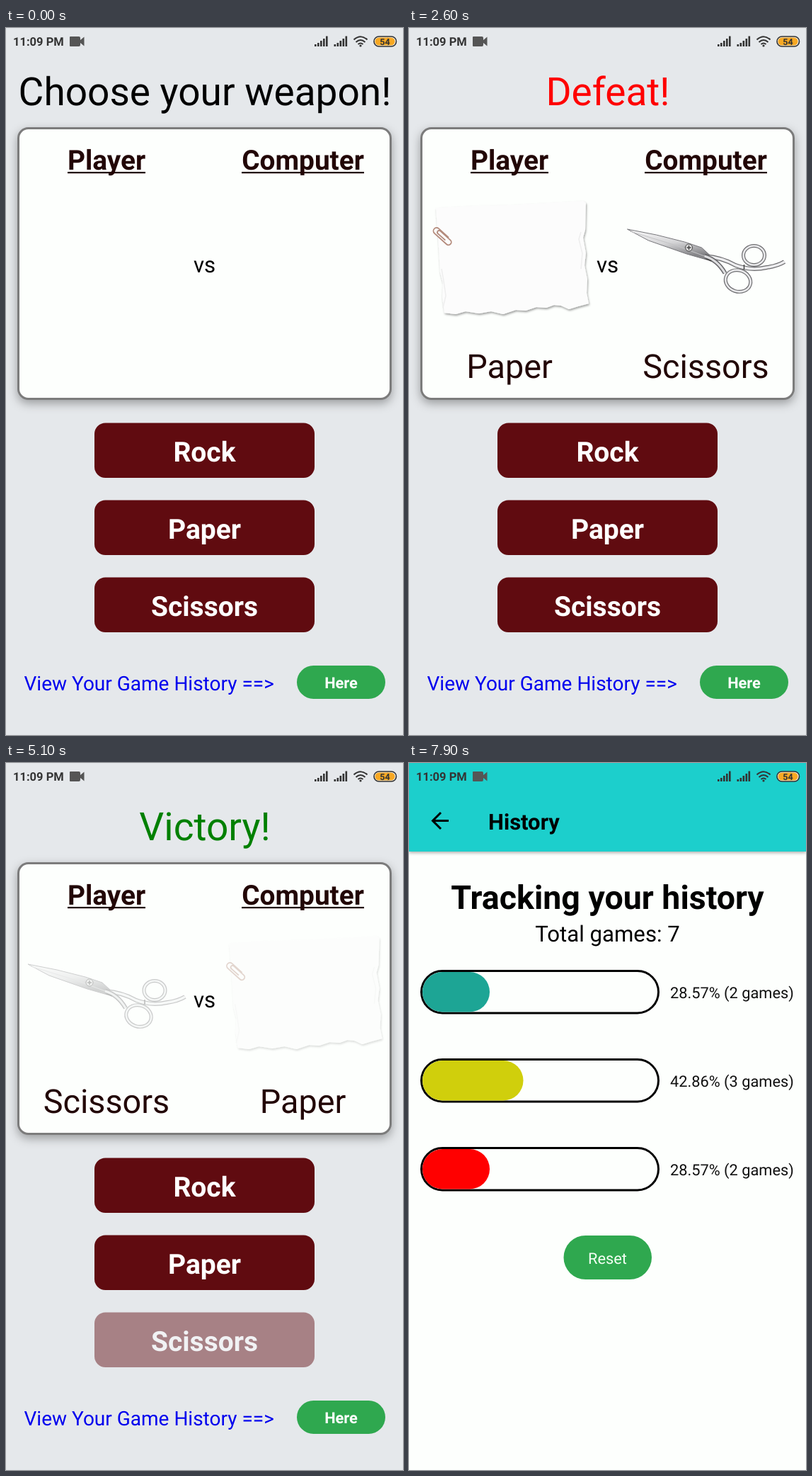
An HTML page for the animation above (8 s loop, 561x998 px).

```html
<!DOCTYPE html>
<html lang="en">
<head>
<meta charset="utf-8">
<title>Rock Paper Scissors</title>
<style>
  html, body { margin: 0; width: 100%; height: 100%; overflow: hidden; background: #e5e8eb; }
  svg { display: block; width: 100vw; height: 100vh; font-family: Roboto, Arial, sans-serif; text-rendering: geometricPrecision; }
  .mid { text-anchor: middle; }
  .bold { font-weight: 700; }
  .dark { fill: #220606; }
  .btn rect { fill: #600b10; }
  .btn text { fill: #fff; font-size: 39px; }
  .pill { fill: #2fa84f; }
  .stat { font-size: 21.8px; fill: #111; }
</style>
</head>
<body>
<svg viewBox="0 0 561 998">
  <defs>
    <filter id="cardShadow" x="-10%" y="-10%" width="120%" height="120%">
      <feDropShadow dx="0" dy="5" stdDeviation="7" flood-opacity=".33"/>
    </filter>
    <filter id="paperShadow" x="-10%" y="-10%" width="120%" height="120%">
      <feDropShadow dx="1" dy="2" stdDeviation="1.6" flood-opacity=".38"/>
    </filter>
    <filter id="barShadow" x="-5%" y="-10%" width="110%" height="130%">
      <feDropShadow dx="0" dy="2" stdDeviation="2" flood-opacity=".3"/>
    </filter>
    <filter id="grain">
      <feTurbulence type="fractalNoise" baseFrequency=".16" numOctaves="4" seed="8"/>
      <feColorMatrix values="0 0 0 0 .3  0 0 0 0 .31  0 0 0 0 .33  1.6 0 0 0 -.6"/>
      <feComposite in2="SourceGraphic" operator="in" result="specks"/>
      <feMerge><feMergeNode in="SourceGraphic"/><feMergeNode in="specks"/></feMerge>
    </filter>
    <linearGradient id="stone" x2=".3" y2="1">
      <stop stop-color="#cfd1d4"/><stop offset="1" stop-color="#b0b2b6"/>
    </linearGradient>
    <linearGradient id="steel" x2=".3" y2="1">
      <stop stop-color="#fafafa"/><stop offset=".55" stop-color="#d5d5d7"/><stop offset="1" stop-color="#858588"/>
    </linearGradient>

    <g id="Rock" filter="url(#grain)">
      <path id="slab" fill="url(#stone)" d="M43 263 60 259 120 256 190 258 227 256 234 261 240 275 245 290 244 322 240 346 236 387 222 390 206 388 165 391 125 393 90 389 61 383 41 377 36 366 38 342 42 300Z"/>
      <path fill="#d6d7da" d="M43 263 60 259 120 256 227 256 222 275 190 290 150 305 128 282 90 271Z"/>
      <path fill="#c2c5ca" d="M227 256 240 275 245 290 244 322 222 307 206 292 222 275Z"/>
      <path fill="#b4b7bc" d="M43 263 90 271 128 282 150 305 132 330 118 360 61 383 41 377 36 366 42 300Z"/>
      <path fill="#a9a9ab" d="M118 360 150 354 182 357 213 377 236 378 236 387 206 388 125 393 98 388Z"/>
      <path fill="none" stroke="#e2e3e5" stroke-width="2" d="M46 270 78 274 128 284 150 306 206 291 224 274M132 330 170 319 206 291"/>
      <path fill="none" stroke="#939599" d="M118 360 150 354 182 357 213 377M150 306 132 330 118 360"/>
    </g>

    <g id="Paper">
      <path filter="url(#paperShadow)" fill="#fcfcfc" d="M38 254 90 251 140 250 195 247 246 244 250 247 249 285 246 296 250 318 248 335 252 355 251 374 254 389 239 393 226 397 215 392 205 391 194 395 180 394 165 399 151 398 133 404 116 400 99 403 80 400 66 404 50 402 47 380 48 360 44 345 42 310Z"/>
      <path fill="none" stroke="#eee" stroke-width="1.5" d="M48 395 52 378 49 357 46 340M243 288 240 298 245 318 243 340"/>
      <g fill="none" stroke="#b48b7c" stroke-width="1.8" transform="translate(47.500 293.500) rotate(42)">
        <path d="M8-4H-11A4.500 4.500 0 0 0-11 5H12A4 4 0 0 0 12-3H-7A2.200 2.200 0 0 0-7 2H7"/>
      </g>
    </g>

    <g id="Scissors" fill="none" stroke="#77777b">
      <path fill="url(#steel)" d="M31 284 72 292 112 302 136 310 148 321 143 327 115 319 61 300Z"/>
      <path stroke="#c4c4c6" d="M35 287 100 307 140 322"/>
      <path stroke="#68686b" stroke-width="6" d="M140 322Q165 324 184 335 205 343 228 338 243 336 253 330"/>
      <path stroke="#ececee" stroke-width="3.500" d="M140 322Q165 324 184 335 205 343 228 338 243 336 253 330"/>
      <path stroke="#68686b" stroke-width="6" d="M140 322Q158 327 169 346"/>
      <path stroke="#dedee0" stroke-width="3" d="M140 322Q158 327 169 346"/>
      <g stroke="#6d6d70" stroke-width="5">
        <ellipse id="ringA" cx="210" cy="321" rx="15" ry="13.500"/>
        <ellipse cx="187.500" cy="357" rx="18" ry="15" transform="rotate(18 187.500 357)"/>
      </g>
      <g stroke="#e9e9eb" stroke-width="2.600">
        <ellipse cx="210" cy="321" rx="15" ry="13.500"/>
        <ellipse cx="187.500" cy="357" rx="18" ry="15" transform="rotate(18 187.500 357)"/>
      </g>
      <circle cx="118" cy="310" r="5" fill="#ddd" stroke="#444"/>
      <path stroke="#444" stroke-width="1.500" d="M115 310H121M118 307V313M142 326 150 329M196 334V341"/>
    </g>
  </defs>

  <rect width="561" height="998" fill="#e5e8eb"/>
  <text id="title" class="mid" x="281" y="109" font-size="55"></text>
  <rect x="17.500" y="141.500" width="526" height="382" rx="14" fill="#fdfffd" stroke="#7b7b7b" stroke-width="3" filter="url(#cardShadow)"/>
  <g class="mid bold dark" font-size="38.800">
    <text x="142" y="200">Player</text><path d="M87 203h110v2.200h-110z"/>
    <text x="419.500" y="200">Computer</text><path d="M333 203h173v2.200h-173z"/>
  </g>
  <text class="mid" x="280.500" y="345" font-size="31.200">vs</text>
  <use id="pic0"/><use id="pic1" x="277.500"/>
  <g class="mid dark" font-size="46.750">
    <text id="name0" x="142" y="494"></text><text id="name1" x="419.500" y="494"></text>
  </g>
  <g id="buttons"></g>
  <text x="25.500" y="935" font-size="28" fill="#0000ee">View Your Game History ==&gt;</text>
  <g id="here">
    <rect class="pill" x="411" y="900" width="125" height="47" rx="23.500"/>
    <text class="mid bold" x="473.500" y="932" font-size="21.800" fill="#fff">Here</text>
  </g>

  <g id="history">
    <rect width="561" height="1098" fill="#fdfffd"/>
    <rect width="561" height="125" fill="#1bcfcc" filter="url(#barShadow)"/>
    <path fill="none" stroke="#000" stroke-width="3" d="M56 81.500H34M45 70 33.500 81.500 45 93"/>
    <text class="bold" x="112" y="94" font-size="31">History</text>
    <text class="mid bold" x="280.500" y="206" font-size="46.500">Tracking your history</text>
    <text class="mid" x="280.500" y="252" font-size="31.200">Total games: 7</text>
    <g id="bars"></g>
    <rect class="pill" x="218.500" y="667" width="124.500" height="62" rx="31"/>
    <text class="mid" x="280.500" y="706.500" font-size="21.800" fill="#f4fff4">Reset</text>
  </g>

  <g id="status" fill="#333">
    <text x="10" y="25" font-size="16.500" font-weight="600">11:09 PM</text>
    <path fill="#555" d="M91 12H103Q105 12 105 14V17L110.500 12.500V25.500L105 21V24Q105 26 103 26H91Q90 26 90 25V13Q90 12 91 12Z"/>
    <path id="signal" d="M436 23h2.600v3h-2.600zM440 21h2.600v5h-2.600zM444 18h2.600v8h-2.600zM448 15h2.600v11h-2.600zM452 11.500h2.600v14.500h-2.600z"/>
    <use href="#signal" x="27.500"/>
    <g fill="none" stroke="#333" stroke-width="2">
      <path d="M491.500 16.500Q501 8 510.500 16.500M494.500 20Q501 14 507.500 20M497.500 23Q501 20 504.500 23"/>
    </g>
    <circle cx="501" cy="25" r="1.600"/>
    <path id="traffic" fill="none" stroke="#333" d="M507 22v4M509.500 22v4"/>
    <rect x="520" y="12" width="31.500" height="14" rx="7" fill="#eee" stroke="#333" stroke-width="1.600"/>
    <path fill="#f7a823" d="M527 13.500H540V24.500H527A5.500 5.500 0 0 1 527 13.500Z"/>
    <path fill="#f7a823" d="M539 13.500H544A5.500 5.500 0 0 1 544 24.500H539Z"/>
    <text class="mid bold" x="535.500" y="23.500" font-size="12.500">54</text>
  </g>
</svg>
<script>
const LOOP = 8000, PRESS = 110, RELEASE = 250;
const FADE_DELAY = 30, FADE = 200;
const OPEN = 6850, OPEN_TIME = 350;
const $ = id => document.getElementById(id);
const clamp = v => Math.min(1, Math.max(0, v));
const easeInOut = p => p < .5 ? 2 * p * p : 1 - 2 * (1 - p) ** 2;

const WEAPONS = ['Rock', 'Paper', 'Scissors'];
const RESULTS = [['Tie game!', '#000'], ['Victory!', '#008000'], ['Defeat!', '#f00']];

// release time, player's weapon, computer's weapon
const games = [
  [1270, 0, 0], [1900, 2, 0], [2250, 1, 2], [3200, 2, 2],
  [4390, 0, 0], [5000, 2, 1], [5983, 1, 0]
];

$('buttons').innerHTML = WEAPONS.map((name, i) => `<g class="btn" id="btn${i}">
  <rect x="125" y="${557.5 + 109 * i}" width="311" height="77.500" rx="15.500"/>
  <text class="mid bold" x="280.500" y="${612 + 109 * i}">${name}</text></g>`).join('');

$('bars').innerHTML = [
  ['28.57% (2 games)', 95, '#1da595'],
  ['42.86% (3 games)', 142.5, '#d0cf0c'],
  ['28.57% (2 games)', 95, '#f00']
].map(([label, width, color], i) => `<g transform="translate(0 ${125 * i})">
  <rect x="17.500" y="293.500" width="335" height="59.500" rx="29.700" fill="none" stroke="#000" stroke-width="3"/>
  <rect x="19" y="295" width="${width}" height="56.500" rx="28.200" fill="${color}"/>
  <text class="stat" x="369" y="332">${label}</text></g>`).join('');

// Touch feedback: dims while held, recovers after release.
function touch(t, release) {
  if (t < release - PRESS || t > release + RELEASE) return 1;
  return t < release
    ? 1 - .8 * easeInOut((t - release + PRESS) / PRESS)
    : .2 + .8 * easeInOut((t - release) / RELEASE);
}

function drawSide(side, t, played) {
  const pic = $('pic' + side), label = $('name' + side);
  if (!played.length) {
    pic.setAttribute('opacity', 0);
    label.textContent = '';
    return;
  }
  let k = played.length - 1;
  const weapon = played[k][side + 1];
  // An unchanged picture stays and does not fade in again.
  while (k > 0 && played[k - 1][side + 1] === weapon) k--;
  const href = '#' + WEAPONS[weapon];
  if (pic.getAttribute('href') !== href) pic.setAttribute('href', href);
  pic.setAttribute('opacity', clamp((t - played[k][0] - FADE_DELAY) / FADE));
  label.textContent = WEAPONS[weapon];
}

function draw(t) {
  const played = games.filter(g => g[0] <= t);
  const last = played[played.length - 1];
  const [text, color] = last ? RESULTS[(last[1] - last[2] + 3) % 3] : ['Choose your weapon!', '#000'];
  $('title').textContent = text;
  $('title').setAttribute('fill', color);
  drawSide(0, t, played);
  drawSide(1, t, played);

  WEAPONS.forEach((_, i) => {
    const dim = games.filter(g => g[1] === i).map(g => touch(t, g[0]));
    $('btn' + i).setAttribute('opacity', Math.min(1, ...dim));
  });
  $('here').setAttribute('opacity', touch(t, OPEN - 20));
  $('traffic').setAttribute('opacity', t >= 6000 && t < 6400 ? 1 : 0);

  const shown = 1 - (1 - clamp((t - OPEN) / OPEN_TIME)) ** 3;
  $('history').setAttribute('opacity', shown);
  $('history').setAttribute('transform', `translate(0 ${80 * (1 - shown)})`);
}

function frame() {
  draw(performance.now() % LOOP);
  requestAnimationFrame(frame);
}
frame();
</script>
</body>
</html>
```
